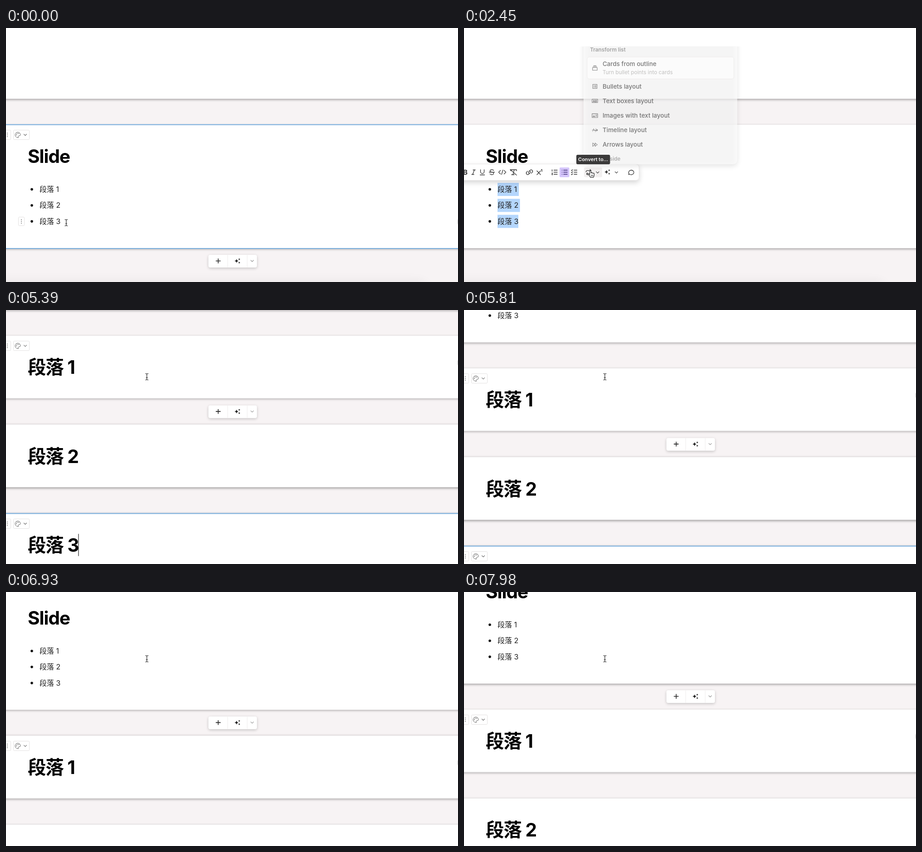
An HTML page with a canvas for the animation above (8 s loop, 998x561 px).

```html
<!DOCTYPE html>
<html lang="zh">
<head>
<meta charset="utf-8">
<title>Outline to cards</title>
<style>
html, body { margin: 0; width: 100%; height: 100%; overflow: hidden; background: #f7f3f4; }
canvas { display: block; }
</style>
</head>
<body>
<canvas id="stage" width="998" height="561"></canvas>
<script>
const ctx = document.getElementById('stage').getContext('2d');
const W = 998, H = 561, LOOP = 8000;
const FONT = '"Inter","Noto Sans CJK SC","Noto Sans CJK JP","Noto Sans CJK TC","Noto Sans CJK",sans-serif';
const BLUE = '#78aedd', INK = '#333';
const ITEMS = ['Bullets layout', 'Text boxes layout', 'Images with text layout', 'Timeline layout', 'Arrows layout'];

// Moments of the story, in ms
const CLICK = 140, DRAG = 280, TOOLBAR = 1100, LEAVE = 1700, MENU = 2383, PICK = 4130, INSERT = 4200, SCROLL = 5391, SWITCH = 6260;

const MOUSE = [[280, 133, 430], [1050, 76, 352], [1470, 76, 352], [2240, 281, 322], [2500, 281, 322],
  [3500, 379, 99], [3640, 379, 99], [3780, 376, 96], [4830, 376, 96], [5040, 311, 147.5]];
// Top edge of the card that follows the list
const TOP = [[5390, 56], [5600, 92], [6230, 200], [6370, 233], [6510, 278], [6720, 320], [6860, 320],
  [6930, 317], [7210, 283], [7650, 283], [7980, 259]];

const clamp = v => Math.max(0, Math.min(1, v));
const ramp = (t, start, length) => clamp((t - start) / length);
const smooth = p => p * p * (3 - 2 * p);
const linear = p => p;

function track(points, t, ease) {
  let i = points.findIndex(p => p[0] > t);
  if (i === 0) return points[0].slice(1);
  if (i < 0) return points[points.length - 1].slice(1);
  const a = points[i - 1], b = points[i];
  const p = ease((t - a[0]) / (b[0] - a[0]));
  return a.slice(1).map((v, k) => v + (b[k + 1] - v) * p);
}

function withState(fn) { ctx.save(); fn(); ctx.restore(); }

function box(x, y, w, h, r, fill, stroke) {
  ctx.beginPath();
  ctx.roundRect(x, y, w, h, r);
  if (fill) { ctx.fillStyle = fill; ctx.fill(); }
  if (stroke) { ctx.strokeStyle = stroke; ctx.lineWidth = 1; ctx.stroke(); }
}

function raised(x, y, w, h, r, color, blur, dy) {
  withState(() => {
    ctx.shadowColor = color; ctx.shadowBlur = blur; ctx.shadowOffsetY = dy;
    box(x, y, w, h, r, '#fff');
  });
}

function text(s, x, y, size, weight, color, spacing = 0, align = 'left') {
  ctx.font = `${weight} ${size}px ${FONT}`;
  ctx.letterSpacing = spacing + 'px';
  ctx.textAlign = align;
  ctx.fillStyle = color;
  ctx.fillText(s, x, y);
}

// Line icon: SVG path data centred on x, y
function icon(d, x, y, color = INK, width = 1.3, fill) {
  withState(() => {
    ctx.translate(x, y);
    const path = new Path2D(d);
    ctx.lineCap = ctx.lineJoin = 'round';
    if (fill) { ctx.fillStyle = fill; ctx.fill(path); }
    if (width) { ctx.strokeStyle = color; ctx.lineWidth = width; ctx.stroke(path); }
  });
}

const CHEVRON = 'M-3-1.5L0 1.5L3-1.5';
const SPARKLE = 'M-2-4.5Q-1.2-.8 2.5 0Q-1.2 .8-2 4.5Q-2.8 .8-6.5 0Q-2.8-.8-2-4.5z' +
  'M4-6Q4.4-4.1 6.2-3.7Q4.4-3.3 4-1.4Q3.6-3.3 1.8-3.7Q3.6-4.1 4-6z' +
  'M4 1.4Q4.4 3.3 6.2 3.7Q4.4 4.1 4 6Q3.6 4.1 1.8 3.7Q3.6 3.3 4 1.4z';

function dot(x, y, r, color) {
  ctx.beginPath();
  ctx.arc(x, y, r, 0, 7);
  ctx.fillStyle = color;
  ctx.fill();
}

function grip(x, y) {
  for (let k = -1; k <= 1; k++) dot(x, y + k * 3.8, 1, '#777');
}

function card(top, height, active) {
  raised(-30, top, W + 60, height, 0, 'rgba(0,0,0,.36)', 5, 1.5);
  ctx.fillStyle = active ? BLUE : '#e3dfe0';
  ctx.fillRect(0, top - .5, W, active ? 2 : 1);
  ctx.fillStyle = active ? BLUE : '#d2cfd0';
  ctx.fillRect(0, top + height - 1, W, active ? 2 : 1);
}

function cardTools(top) {
  const y = top + 23;
  box(-10.5, y - 10.5, 21, 21, 2, '#fff', '#e3e1e1');
  grip(3, y);
  box(16.5, y - 10.5, 35, 21, 2, '#fff', '#e3e1e1');
  icon('M1 6A6 6 0 1 1 6-.5Q6 2 3 2Q.5 2 1 6z', 26, y, '#666', 1);
  [[-3, 0], [-1.5, -3], [2, -3]].forEach(([x, dy]) => dot(26 + x, y + dy, 1, '#666'));
  icon(CHEVRON, 42.5, y, '#777', 1.2);
}

function rowTools(y) {
  box(27.5, y - 9.5, 13, 19, 2, '#fff', '#e3e1e1');
  grip(34, y);
}

function edgeButton(y) {
  ctx.beginPath();
  ctx.arc(1010, y, 13, 0, 7);
  ctx.strokeStyle = '#ccc';
  ctx.lineWidth = 1;
  ctx.stroke();
}

function addBar(y, alpha) {
  if (alpha <= 0) return;
  withState(() => {
    ctx.globalAlpha = alpha;
    raised(447, y - 13.5, 107, 28, 4, 'rgba(0,0,0,.2)', 6, 2);
    ctx.fillStyle = '#eeecec';
    ctx.fillRect(489, y - 13, 1, 27);
    ctx.fillRect(532, y - 13, 1, 27);
    icon('M-4.7 0H4.7M0-4.7V4.7', 468.5, y, '#222', 1.6);
    icon(SPARKLE, 511, y, INK, 0, '#222');
    icon(CHEVRON, 543.5, y, '#999', 1.2);
  });
}

const title = (s, top) => text(s, 48, top + 85, 40.5, 700, '#000', -1);

function caret(x, y, h) {
  ctx.fillStyle = '#222';
  ctx.fillRect(x, y, 1.2, h);
}

// Selection runs from the pointer's text position to the end of the list
function selection(t, mouse) {
  if (t < DRAG || t >= INSERT) return;
  const ends = [121, 123.5, 120], stops = [74, 90, 106, 110, 120];
  const held = t < 1050 ? mouse : [70, 352];
  const row = held[1] > 409 ? 2 : held[1] > 374 ? 1 : 0;
  const start = stops.reduce((a, b) => Math.abs(b - held[0]) < Math.abs(a - held[0]) ? b : a);
  ctx.fillStyle = '#b4d6fd';
  for (let i = row; i < 3; i++) {
    const x = i === row ? start : 74;
    ctx.fillRect(x, 342 + i * 35.3, Math.max(0, ends[i] - x), 29);
  }
}

function listCard(t, top, mouse) {
  const y = i => top + 143.3 + i * 35.4;
  card(top, 274, t < MENU);
  title('Slide', top);
  selection(t, mouse);
  for (let i = 0; i < 3; i++) {
    dot(57, y(i), 2.8, '#111');
    text('段落 ' + (i + 1), 74, y(i) + 5.7, 16, 400, '#222');
  }
  if (t < MENU) cardTools(top);
  if (t < LEAVE) {
    const row = mouse[1] > 409 ? 2 : mouse[1] > 374 ? 1 : 0;
    rowTools(y(row));
    edgeButton(y(row) + 1);
  }
  if (t >= CLICK && t < DRAG) caret(119.5, 416, 21);
}

function nextSection(top) {
  withState(() => {
    ctx.shadowColor = 'rgba(0,0,0,.07)';
    ctx.shadowBlur = 24;
    box(-60, top, 990, 300, 20, '#f3f0f0');
  });
}

function toolbar(t) {
  const y = 318.5;
  raised(-20, 300, 407, 36.5, 7, 'rgba(0,0,0,.17)', 12, 5);
  box(-20, 300.5, 406.5, 36, 7, null, '#e9e7e7');
  box(211, 308, 21.5, 21.5, 2, '#d4c5fb');
  if (t > 2150 && t < 2600) box(265, 308, 40, 21.5, 3, '#f2f0f0');
  text('B', 3, y + 5.5, 15, 700, INK, 0, 'center');
  icon('M-1-5H4M-4 5H1M2-5L-2 5', 21, y);
  icon('M-4-5.5V-1a4 4 0 0 0 8 0V-5.5M-5 6H5', 40.5, y);
  icon('M4-4Q2.5-5.7 0-5.5Q-4-5.3-4-2.8Q-4-1 0 0M-6 0H6M2 .5Q4.3 1.5 4 3Q3.6 5.5 0 5.5Q-3 5.5-4.3 3.5', 61.5, y);
  icon('M-4-4L-8 0L-4 4M4-4L8 0L4 4M1.5-5L-1.5 5', 84.5, y);
  icon('M-6-3V-5.5H7V-3M2-5.5L-1 5.5M-4 5.5H2M-7-6L7 6.5', 109, y);
  icon('M-1 2.5A3.2 3.2 0 0 1-1.5-1.5L1.8-4.6A3.3 3.3 0 0 1 6.4 0L4 2.4M1-2.5A3.2 3.2 0 0 1 1.5 1.5L-1.8 4.6A3.3 3.3 0 0 1-6.4 0L-4-2.4', 144.5, y);
  icon('M-6-3L2 5.5M2-3L-6 5.5M3.5-5.5L5-6.2V-1.5', 167, y);
  icon('M-1.5-4.5H6M-1.5 0H6M-1.5 4.5H6M-5.5-5.5V-2M-6 2H-4.5L-6 5.5H-4.3', 200, y);
  icon('M-2-4.5H6M-2 0H6M-2 4.5H6M-5.5-4.5h.1M-5.5 0h.1M-5.5 4.5h.1', 222, y, '#3b2b70', 1.5);
  icon('M0-4.5H6.5M0 0H6.5M0 4.5H6.5M-6-4.5L-5-3.3L-3-5.7M-6 0L-5 1.2L-3-1.2M-6 4.5L-5 5.7L-3 3.3', 243, y);
  icon('M-6-.5V-1a2.7 2.7 0 0 1 2.7-2.7H5M2.7-6L5-3.7L2.7-1.4M6 .5V1a2.7 2.7 0 0 1-2.7 2.7H-5M-2.7 1.4L-5 3.7L-2.7 6', 275.5, y);
  icon(CHEVRON, 295, y + .5, '#555', 1.2);
  icon(SPARKLE, 316.5, y - .5, INK, 0, INK);
  icon(CHEVRON, 336.5, y + .5, '#555', 1.2);
  icon('M-3.6 4.2L-5.5 5.3L-5 2.5A5.8 5 0 1 1-3.6 4.2z', 369, y);
}

function menuIcons() {
  const x = 290.5;
  icon('M-5.5-1H5.5V5H-5.5zM-4.5-3.2H4.5M-3-5.4H3', x, 75.5, '#444', 1.1);
  icon('M-5-4.7H5V4.7H-5zM-2.8-2.2h.5M-.5-2.2H3M-2.8 0h.5M-.5 0H3M-2.8 2.2h.5M-.5 2.2H3', x, 118.5, '#444', 1.1);
  icon('M-6.5-4H6.5V4H-6.5z', x, 152.5, '#444', 1.1);
  text('AB', x, 155.2, 7, 800, '#444', 0, 'center');
  icon('M-6.5-4.5H6.5V4.5H-6.5zM2-1.5H4.5M2 1.2H4.5M-4.5 2.3Q-2.3-1 0 2.3zM-2.3-1.6h.1', x, 187, '#444', 1.2);
  icon('M-6 0H6M4-2L6.2 0L4 2M-3 0V-2M1 0V2M-3-3.5h.1M1 3.7h.1M-5 3h.1M2-3.5h.1', x, 221, '#444', 1.4);
  icon('M-5-4L.2 0L-5 4zM.5-4L5.7 0L.5 4z', x, 255, '#444', 1.1);
}

function menu(t, mouse) {
  const p = ramp(t, MENU, 160);
  if (!p) return;
  withState(() => {
    const scale = .9 + .1 * p;
    ctx.translate(264, 301);
    ctx.scale(scale, scale);
    ctx.translate(-264, -301);
    ctx.globalAlpha = Math.sqrt(p);
    ctx.beginPath();
    ctx.rect(200, 25, 500, 330);
    ctx.clip();
    raised(264, 0, 360, 301, 10, 'rgba(0,0,0,.17)', 12, 4);
    const hover = t > 2600 ? mouse[1] - 6 : 400;
    const onCards = hover < 101;
    text('Transform list', 279, 36.5, 12.5, 600, '#777');
    box(272.5, 49.5, 343.5, 51.5, 5, onCards ? '#f5f4f2' : '#fff', onCards ? '#dedcda' : '#e6e5e4');
    text('Cards from outline', 308.5, 70.3, 14.3, 500, INK);
    text('Turn bullet points into cards', 308.5, 90.3, 12.5, 400, '#a3a1a0');
    ITEMS.forEach((name, i) => {
      const y = 118.5 + i * 34.1;
      if (Math.abs(hover - y) < 17) box(272, y - 17, 344, 34, 5, '#f5f4f2');
      text(name, 308.5, y + 5.2, 14.3, 500, INK);
    });
    menuIcons();
    text('Wrap inside', 279, 293, 12.5, 600, '#888');
  });
}

function tooltip() {
  box(248, 280, 74.5, 21, 3, '#3b3a3a');
  text('Convert to...', 285.2, 294.3, 11, 600, '#fff', 0, 'center');
}

function pointer(t, [x, y]) {
  if (t > 1950 && t < PICK) {
    icon('M-3.5 2.5V-5.6a1.4 1.4 0 0 1 2.8 0V-1.5a1.3 1.3 0 0 1 2.6 .2a1.3 1.3 0 0 1 2.4 .5a1.2 1.2 0 0 1 2.2 .6V3q0 2-1.3 3.6V7.6H-2.4V6.6L-6 2.2q-.8-1.4.3-1.9q1-.4 2.2 1.2z', x, y, '#222', 1.1, '#fff');
    icon('M-.2 2.5V5M1.8 2.5V5M3.8 2.5V5', x, y, '#222', .9);
    return;
  }
  const beam = 'M-3-7Q-.5-7 0-6Q.5-7 3-7M0-6V6M-3 7Q-.5 7 0 6Q.5 7 3 7M-1.5 2H1.5';
  icon(beam, x, y, '#fff', 2.6);
  icon(beam, x, y, '#222', 1.2);
}

function newCards(t, top) {
  for (let i = 0; i < 3; i++) {
    const y = top + i * 196.4;
    card(y, 139.5, i === 2);
    title('段落 ' + (i + 1), y);
  }
  const third = top + 392.8;
  cardTools(third);
  const blink = t < 4690 || (t >= 5250 && t < 5810) || (t >= 6370 && t < 6930);
  if (blink) caret(159.5, third + 45.5, 49);
  if (t > 4900) {
    cardTools(top);
    edgeButton(top + 60);
    if (t < SCROLL) rowTools(top + 69);
  }
}

function draw(t) {
  const mouse = track(MOUSE, t, smooth);
  const inserted = t >= INSERT;
  const top = inserted ? track(TOP, t, linear)[0] : 543;
  ctx.fillStyle = '#f7f3f4';
  ctx.fillRect(0, 0, W, H);

  nextSection(top + (inserted ? 607 : 18));
  card(top - 786, 400, false);
  listCard(t, top - 330, mouse);
  if (inserted) {
    newCards(t, top);
    const moved = ramp(t, SWITCH, 150);
    addBar(top - 28.5, moved);
    addBar(top + 168, ramp(t, 4260, 150) * (1 - moved));
  } else {
    addBar(514.5, 1 - ramp(t, LEAVE, 150));
  }

  if (t < PICK) {
    withState(() => {
      ctx.globalAlpha = ramp(t, TOOLBAR, 150);
      if (ctx.globalAlpha > 0) toolbar(t);
    });
    menu(t, mouse);
    if (t > 2200 && t < 2640) tooltip();
  }
  pointer(t, mouse);
}

function tick() {
  draw(performance.now() % LOOP);
  requestAnimationFrame(tick);
}
tick();
</script>
</body>
</html>
```
